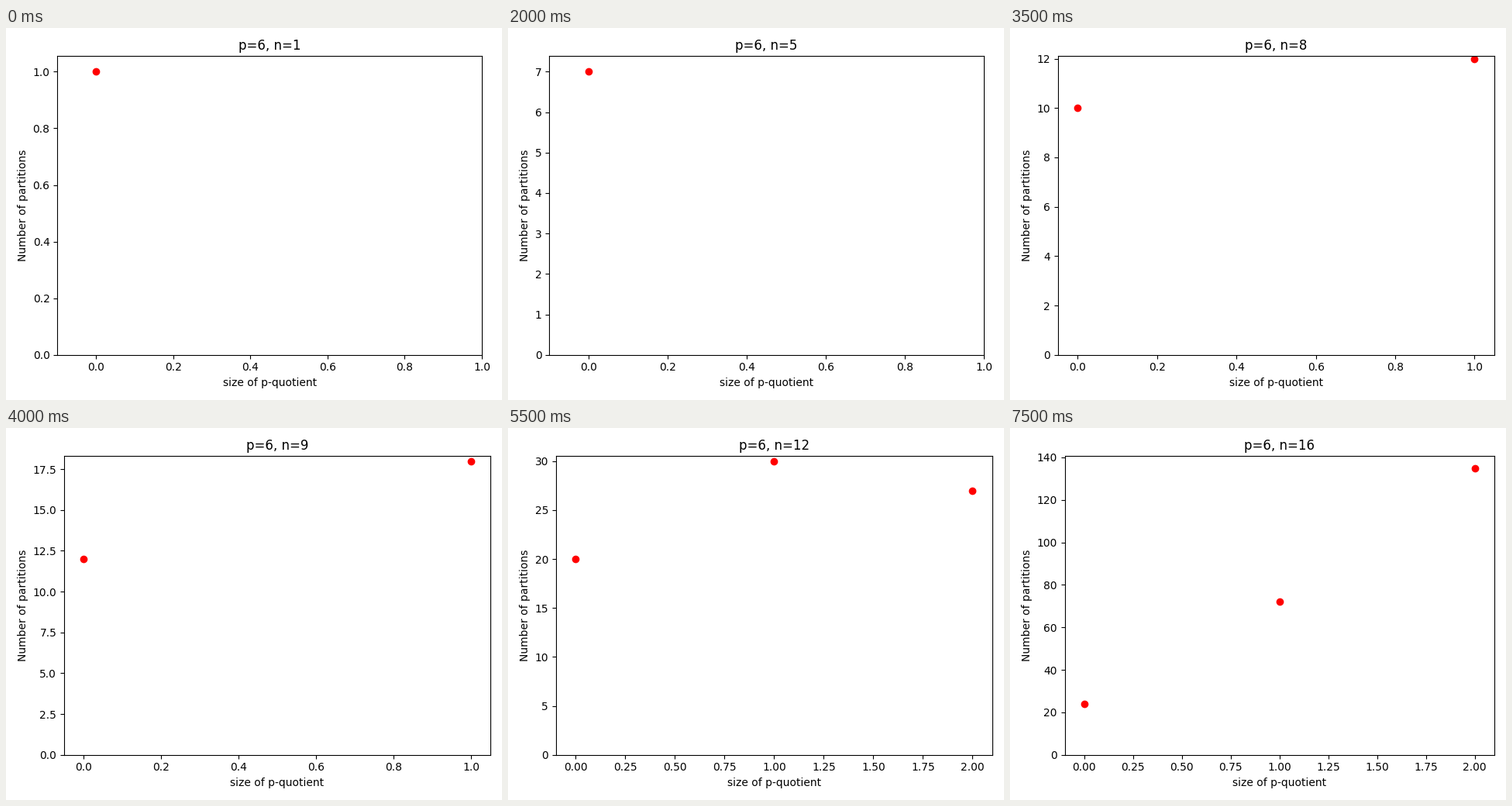
Animation, 640 px wide and 480 px high, one loop 8000 ms. Source, as a matplotlib script:

```python
import numpy as np
import matplotlib.pyplot as plt
from matplotlib.animation import FuncAnimation

P = 6
N_MAX = 16
WIDTH, HEIGHT, DPI = 640, 480, 100


def euler_power(e, step=1):
    """Coefficients of prod_k (1 - x^(step*k))^e up to x^N_MAX."""
    c = np.zeros(N_MAX + 1, dtype=int)
    c[0] = 1
    for k in range(step, N_MAX + 1, step):
        for _ in range(abs(e)):
            if e > 0:
                c[k:] -= c[:-k].copy()
            else:
                for i in range(k, N_MAX + 1):
                    c[i] += c[i - k]
    return c


# Each partition corresponds to a p-core together with a p-quotient.
cores = np.convolve(euler_power(P, P), euler_power(-1))[:N_MAX + 1]
quotients = euler_power(-P)


def counts(n):
    return [cores[n - P * w] * quotients[w] for w in range(n // P + 1)]


fig = plt.figure(figsize=(WIDTH / DPI, HEIGHT / DPI), dpi=DPI)
MARGINS = {side: plt.rcParams[f"figure.subplot.{side}"]
           for side in ("left", "right", "bottom", "top")}
# The title has no ascenders, so its line box may rise one pixel.
LAYOUT_RECT = (0, 0, 1, 1 + 1 / HEIGHT)


def update(i):
    n = i + 1
    fig.clear()
    fig.subplots_adjust(**MARGINS)
    ax = fig.add_subplot()
    ys = counts(n)
    ax.plot(range(len(ys)), ys, "ro")
    if len(ys) == 1:
        ax.set_xlim(-0.1, 1)
    ax.set_ylim(bottom=0)
    ax.set_title(f"p={P}, n={n}")
    ax.set_xlabel("size of p-quotient")
    ax.set_ylabel("Number of partitions")
    fig.tight_layout(rect=LAYOUT_RECT)
    return ax.lines


anim = FuncAnimation(fig, update, frames=N_MAX, interval=500,
                     repeat=True, repeat_delay=0)
plt.show()
```
